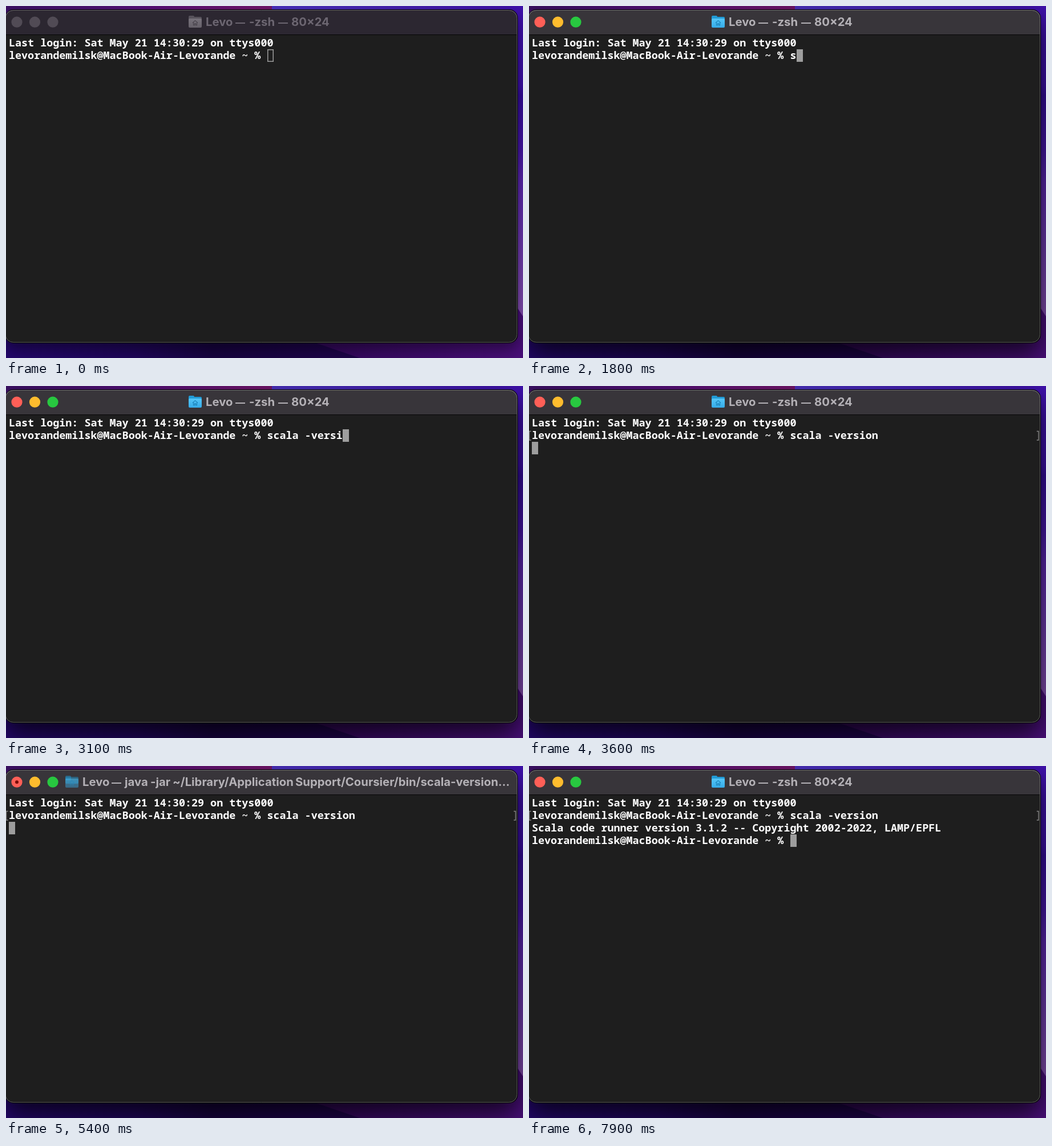
Animation of 906x618 px, one loop 8000 ms. Source, as an HTML page with a canvas:

```html
<!DOCTYPE html>
<html lang="en">
<head>
<meta charset="utf-8">
<title>Terminal session</title>
<style>
html, body { margin: 0; width: 100%; height: 100%; overflow: hidden; background: #1c0640; }
canvas { display: block; }
</style>
</head>
<body>
<canvas id="stage" width="906" height="618"></canvas>
<script>
const ctx = document.getElementById('stage').getContext('2d');
const LOOP = 8000;
const CELL = 11.04, ROW = 22, LEFT = 5, TOP = 54;
const PROMPT = 'levorandemilsk@MacBook-Air-Levorande ~ % ';
const COMMAND = 'scala -version';
const OUTPUT = 'Scala code runner version 3.1.2 -- Copyright 2002-2022, LAMP/EPFL';

const FOCUS = 700, ENTER = 3600, RUN = 3800, DONE = 5600;
const keyTime = i => i < 6 ? 1800 + i * 100 : i === 6 ? 2500 : 2000 + i * 100;

const SHORT_TITLE = [['Levo', 350], ['—', 402], ['-zsh', 426], ['—', 477], ['80×24', 500]];
const LONG_TITLE = [['Levo', 134], ['—', 185], ['java', 208], ['-jar', 253],
  ['~/Library/Application', 292], ['Support/Coursier/bin/scala', 507], ['-version...', 779]];

function gradient(x0, y0, x1, y1, ...stops) {
  const g = ctx.createLinearGradient(x0, y0, x1, y1);
  for (const [at, color] of stops) g.addColorStop(at, color);
  return g;
}

function rect(color, x, y, w, h) {
  ctx.fillStyle = color;
  ctx.fillRect(x, y, w, h);
}

function polygon(color, ...points) {
  ctx.fillStyle = color;
  ctx.beginPath();
  for (const [x, y] of points) ctx.lineTo(x, y);
  ctx.fill();
}

function roundRect(x, y, w, h, r) {
  ctx.beginPath();
  ctx.roundRect(x, y, w, h, r);
}

function disc(color, x, y, r) {
  ctx.fillStyle = color;
  ctx.beginPath();
  ctx.arc(x, y, r, 0, Math.PI * 2);
  ctx.fill();
}

function drawWallpaper() {
  rect(gradient(0, 0, 466, 0, [0, '#3b1064'], [0.5, '#541078'], [1, '#74166c']), 0, 0, 466, 60);
  rect(gradient(466, 0, 906, 0, [0, '#4a32c0'], [0.5, '#4420b0'], [1, '#3e10aa']), 466, 0, 440, 60);
  rect(gradient(0, 0, 0, 560, [0, '#3e10aa'], [0.25, '#3a0fa4'], [0.28, '#320c98'],
    [0.45, '#4416a4'], [0.55, '#5826aa'], [1, '#8450ac']), 880, 8, 26, 552);
  rect(gradient(0, 0, 906, 0, [0, '#22066a'], [0.25, '#1e0558'], [0.4, '#16033f'], [0.62, '#1c0348']),
    0, 560, 906, 58);
  polygon(gradient(560, 0, 906, 0, [0, '#32075a'], [1, '#480e78']),
    [480, 570], [620, 618], [906, 618], [906, 545], [880, 505]);
}

function drawWindow(active) {
  ctx.save();
  ctx.shadowColor = active ? 'rgba(0,0,0,.72)' : 'rgba(0,0,0,.45)';
  ctx.shadowBlur = active ? 44 : 26;
  ctx.shadowOffsetY = active ? 18 : 10;
  ctx.fillStyle = '#000';
  roundRect(-2, 6, 899, 586, 15);
  ctx.fill();
  ctx.restore();

  ctx.save();
  roundRect(-1.5, 7, 897.5, 584, 14);
  ctx.clip();
  rect('#1e1e1e', -2, 7, 900, 584);
  rect(active ? '#38353a' : '#2c2731', -2, 7, 900, 43);
  rect('#050505', -2, 50, 900, 1);
  ctx.restore();

  ctx.lineWidth = 1;
  ctx.strokeStyle = gradient(0, 7, 0, 590, [0, active ? '#77747a' : '#6a656e'], [0.1, '#565458'], [1, '#565656']);
  roundRect(-1, 7.5, 896.5, 583, 14);
  ctx.stroke();
}

function drawLights(active, running) {
  const colors = active ? ['#ff5f57', '#febc2e', '#28c840'] : ['#514b55', '#514b55', '#514b55'];
  colors.forEach((color, i) => disc(color, 19 + i * 31.5, 28.2, 9.6));
  if (running) disc('#7a0d08', 19, 28.2, 3);
}

function drawFolder(x, colors, alpha) {
  const [back, light, dark, house] = colors;
  ctx.save();
  ctx.globalAlpha = alpha;
  ctx.translate(x, 17);
  ctx.fillStyle = back;
  roundRect(0, 0, 10, 8, 2);
  ctx.fill();
  roundRect(0, 2, 23, 12, 2);
  ctx.fill();
  ctx.fillStyle = gradient(0, 5, 0, 21, [0, light], [1, dark]);
  roundRect(0, 5, 23, 16, 2);
  ctx.fill();
  ctx.strokeStyle = house;
  ctx.lineWidth = 1.3;
  ctx.beginPath();
  for (const [px, py] of [[7, 12.5], [11.5, 8.5], [16, 12.5]]) ctx.lineTo(px, py);
  ctx.moveTo(8.5, 12);
  for (const [px, py] of [[8.5, 16.5], [10.5, 16.5], [10.5, 14], [12.5, 14], [12.5, 16.5], [14.5, 16.5], [14.5, 12]])
    ctx.lineTo(px, py);
  ctx.stroke();
  ctx.restore();
}

function drawTitle(t, active, running) {
  const blue = ['#229bd6', '#55c6f8', '#35abe8', '#1f88bf'];
  const gray = ['#57525b', '#77727b', '#66616a', '#4c4750'];
  const dim = running ? 1 - 0.55 * Math.min(1, (t - RUN) / 300) : 1;
  drawFolder(running ? 104 : 320, active ? blue : gray, dim);

  ctx.fillStyle = active ? '#b4b1b6' : '#6c6671';
  for (const [word, x] of running ? LONG_TITLE : SHORT_TITLE) {
    ctx.font = `700 ${word === '—' ? 17 : 20.3}px Inter, sans-serif`;
    ctx.fillText(word, x, 35);
  }
}

function drawLine(text, row) {
  ctx.font = '600 18.4px "Noto Sans Mono", monospace';
  ctx.fillStyle = '#fff';
  ctx.fillText(text, LEFT, TOP + row * ROW + 17);
}

function drawCursor(col, row, active) {
  const x = Math.round(LEFT + col * CELL), y = TOP + row * ROW;
  if (active) return rect('#9d9d9d', x, y, 11, ROW);
  ctx.strokeStyle = '#9d9d9d';
  ctx.lineWidth = 1.5;
  ctx.strokeRect(x + 0.75, y + 0.75, 9.5, ROW - 1.5);
}

function drawBracket(x, side) {
  ctx.strokeStyle = '#858585';
  ctx.lineWidth = 1.4;
  ctx.beginPath();
  ctx.moveTo(x + side * 3.2, 79.5);
  ctx.lineTo(x, 79.5);
  ctx.lineTo(x, 95);
  ctx.lineTo(x + side * 3.2, 95);
  ctx.stroke();
}

function drawTerminal(t, active) {
  const typed = [...COMMAND].filter((_, i) => t >= keyTime(i)).join('');
  const line = PROMPT + typed;
  drawLine('Last login: Sat May 21 14:30:29 on ttys000', 0);

  if (t < ENTER) drawCursor(line.length, 1, active);
  else {
    drawBracket(0.5, 1);
    drawBracket(893, -1);
    if (t < DONE) drawCursor(0, 2, active);
  }
  drawLine(line, 1);

  if (t >= DONE) {
    drawLine(OUTPUT, 2);
    drawCursor(PROMPT.length, 3, active);
    drawLine(PROMPT, 3);
  }
}

function render(t) {
  const active = t >= FOCUS;
  const running = t >= RUN && t < DONE;
  drawWallpaper();
  drawWindow(active);
  drawLights(active, running);
  drawTitle(t, active, running);
  drawTerminal(t, active);
}

function tick() {
  render(performance.now() % LOOP);
  requestAnimationFrame(tick);
}
tick();
</script>
</body>
</html>
```
